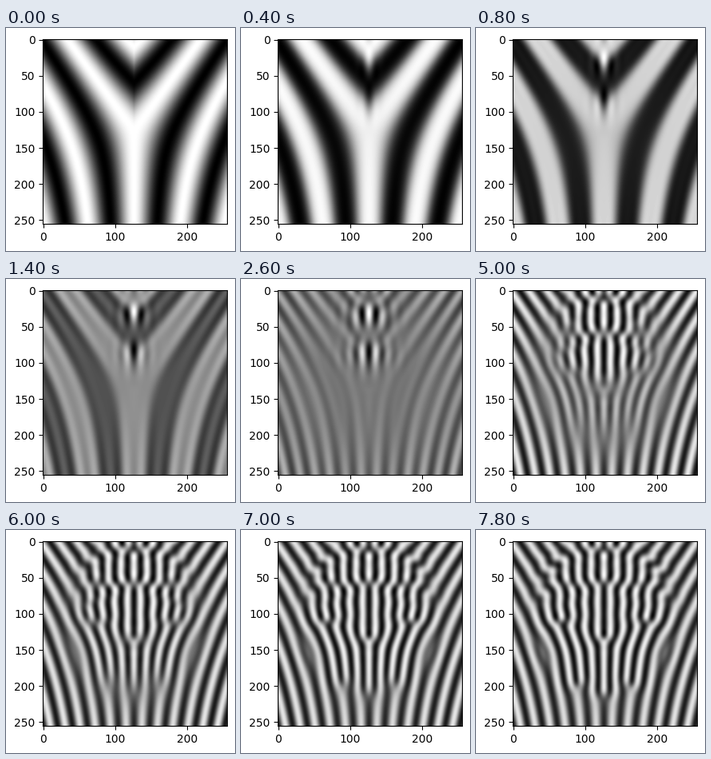
A matplotlib script for the animation above (8 s loop, 287 by 279 pixels).

```python
import numpy as np
import matplotlib.pyplot as plt
from matplotlib.animation import FuncAnimation

W, H, DPI = 287, 279, 100
FRAMES, INTERVAL = 40, 200

SIZE, PAD = 256, 128       # visible grid and hidden margin
CX, CY = 126.3, 127
K0 = 0.368                 # preferred wavenumber per cell
R = 0.45                   # growth parameter
AMPLITUDE = 0.5
FRAME_TIME, SUBSTEPS = 0.56, 6


def wedge_pattern():
    """Wide stripes around a Y-shaped disclination."""
    axis = np.arange(-PAD, SIZE + PAD)
    x, y = np.meshgrid(np.abs(axis - CX), axis - CY)
    radius, angle = np.hypot(x, y), np.arctan2(x, y)
    phase = 0.0231 * radius**1.25 * np.sin(1.25 * angle)
    return AMPLITUDE * np.cos(phase)


def swift_hohenberg(u):
    """Evolve u_t = R u - (1 + lap)^2 u - u^3, one visible field per frame."""
    n = len(u)
    kx = 2 * np.pi * np.fft.rfftfreq(n) / K0
    ky = 2 * np.pi * np.fft.fftfreq(n) / K0
    rate = R - (1 - kx[None, :]**2 - ky[:, None]**2)**2
    rate = np.where(np.abs(rate) < 1e-9, 1e-9, rate)
    h = FRAME_TIME / SUBSTEPS
    decay, gain = np.exp(rate * h), np.expm1(rate * h) / rate
    view = slice(PAD, PAD + SIZE)

    fields = [u[view, view].copy()]
    spectrum = np.fft.rfft2(u)
    for _ in range(FRAMES - 1):
        for _ in range(SUBSTEPS):
            spectrum = decay * spectrum - gain * np.fft.rfft2(u**3)
            u = np.fft.irfft2(spectrum, s=(n, n))
        fields.append(u[view, view].copy())
    return fields


fields = swift_hohenberg(wedge_pattern())

fig = plt.figure(figsize=(W / DPI, H / DPI), dpi=DPI, facecolor="white")
ax = fig.add_axes([46.2 / W, (H - 245.2) / H, 231 / W, 231 / H])
image = ax.imshow(fields[0], cmap="gray")
ax.set_xticks([0, 100, 200])
ax.set_yticks(range(0, 251, 50))


def draw(i):
    field = fields[i]
    image.set_data(field)
    image.set_clim(field.min(), field.max())
    return [image]


anim = FuncAnimation(fig, draw, frames=FRAMES, interval=INTERVAL,
                     repeat=True, repeat_delay=0, blit=False)
plt.show()
```
